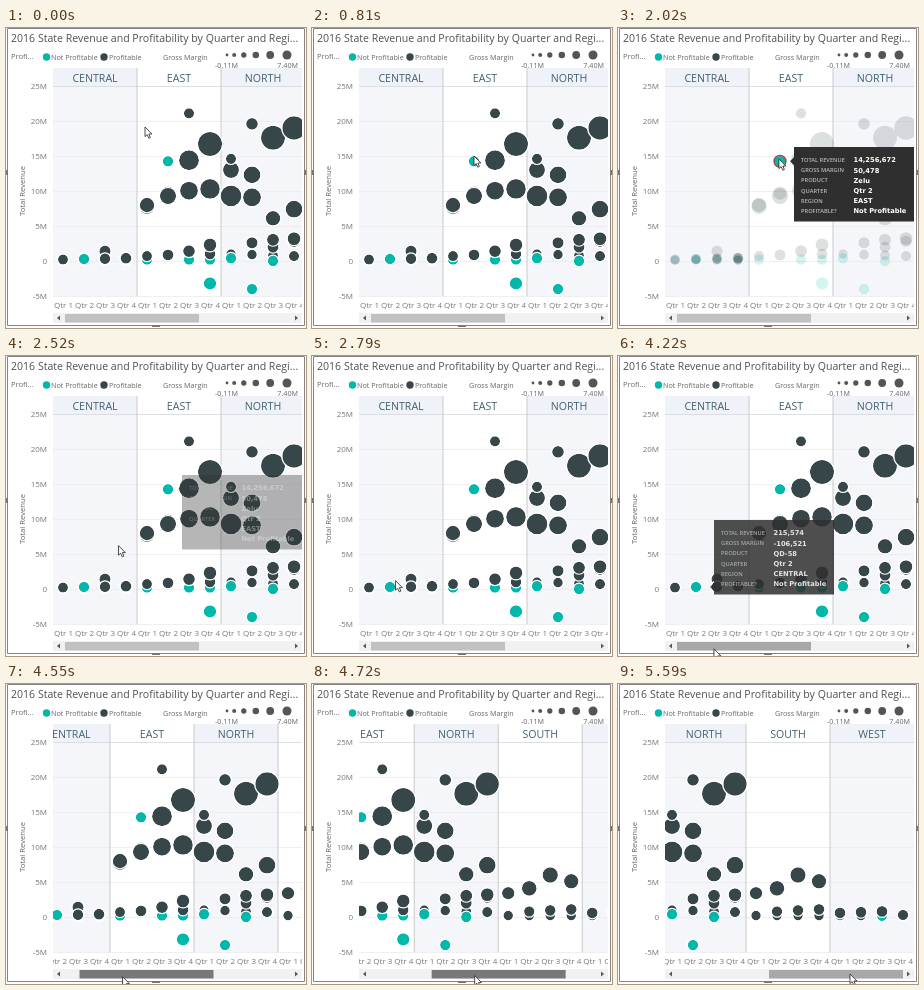
These frames come from a looping animation (300x300 px, 5640 ms). An HTML page with a canvas:

```html
<!DOCTYPE html>
<html lang="en">
<head>
<meta charset="utf-8">
<title>Revenue by quarter and region</title>
<style>
  html, body { margin: 0; width: 100%; height: 100%; overflow: hidden; background: #fff; }
  canvas { display: block; width: 300px; height: 300px; }
</style>
</head>
<body>
<canvas id="stage"></canvas>
<script>
const LOOP = 5640;
const DARK = '#374649', TEAL = '#01b8aa';
const VIEW = { x: 47, y: 40, w: 249, h: 243 };
const PANEL = 84, STEP = 21;
const MAX_SCROLL = 171, THUMB_RANGE = 92, GRAB_X = 102;
const SANS = '"Open Sans", "Noto Sans", sans-serif';
const WIDE = '"DejaVu Sans", sans-serif';
const regions = ['CENTRAL', 'EAST', 'NORTH', 'SOUTH', 'WEST'];

const canvas = document.getElementById('stage');
const ctx = canvas.getContext('2d');
const ratio = window.devicePixelRatio || 1;
canvas.width = canvas.height = 300 * ratio;

const mix = (a, b, p) => a + (b - a) * p;
const ramp = (t, start, length) => Math.min(1, Math.max(0, (t - start) / length));
const smooth = p => p * p * (3 - 2 * p);
const linear = p => p;
const easeIn = p => p * p;
const easeOut = p => 1 - (1 - p) ** 2;
const revenueY = millions => 233 - 7 * millions;

// A product's bubbles run over consecutive quarters between two [revenue, radius] ends.
const bubbles = [];
function series(first, last, from, to, ease = linear, teal = false) {
  for (let q = first; q <= last; q++) {
    const p = last > first ? (q - first) / (last - first) : 0;
    bubbles.push({
      x: 57 + STEP * q,
      y: revenueY(mix(from[0], to[0], ease(p))),
      r: mix(from[1], to[1], p),
      teal
    });
  }
}
function loss(q, revenue, r = 5.2) {
  series(q, q, [revenue, r], [revenue, r], linear, true);
  return bubbles[bubbles.length - 1];
}
function single(q, revenue, r) {
  series(q, q, [revenue, r], [revenue, r]);
}

// Central: a stack near zero that thickens each quarter
for (let q = 0; q < 4; q++) {
  for (let i = 0; i <= q; i++) single(q, 0.1 + 0.2 * (i % 3), 4.6);
  loss(q, 0.2, 4.6);
}
series(2, 3, [1.4, 5.6], [0.4, 5.4]);
series(0, 3, [0.2, 5], [0.4, 5.4]);
const centralLoss = loss(1, 0.3);

// East
[4, 6, 7].forEach(q => loss(q, 0.2));
series(4, 5, [7.8, 7.7], [9.7, 6.6]);
series(4, 7, [8, 7.2], [10.3, 9.9], easeOut);
series(6, 7, [14.4, 10], [16.7, 12]);
single(6, 21.1, 5.1);
single(7, 1, 5.3);
series(4, 7, [0.7, 5], [2.3, 6.4], easeIn);
loss(7, -3.2, 6.2);
const eastLoss = loss(5, 14.25);

// North
series(8, 9, [13, 8], [12.3, 8.4]);
series(8, 9, [14.6, 5.1], [19.6, 5.9]);
series(8, 9, [9.3, 10.4], [9.1, 9]);
series(8, 11, [1, 4.7], [0.7, 5.1]);
series(10, 11, [2, 5.5], [2.8, 5.6]);
series(9, 11, [2.6, 5.6], [3.2, 6.4], easeOut);
series(10, 11, [6.1, 7.3], [7.4, 8.4]);
series(10, 11, [17.6, 12], [19, 11.7]);
loss(8, 0.4);
loss(9, -4);
loss(10, 0);

// South and West
series(12, 19, [0.2, 4.8], [0.2, 4.8]);
series(12, 13, [3.4, 6.2], [4.1, 7.4]);
series(14, 15, [6, 7.7], [5.1, 7.2]);
series(13, 15, [0.8, 5.2], [1.1, 5.4]);
loss(18, 0.1, 4.8);
series(16, 18, [0.6, 5.4], [0.8, 5.4]);
single(19, 0.3, 5.2);

const labels = ['TOTAL REVENUE', 'GROSS MARGIN', 'PRODUCT', 'QUARTER', 'REGION', 'PROFITABLE?'];
const hovers = [
  { x: 176, y: 119, mark: eastLoss, enter: 870, show: 1230, leave: 2190,
    values: ['14,256,672', '50,478', 'Zelu', 'Qtr 2', 'EAST', 'Not Profitable'] },
  { x: 96, y: 164, mark: centralLoss, enter: 2850, show: 3380, leave: 3960,
    values: ['215,574', '-106,521', 'QD-58', 'Qtr 2', 'CENTRAL', 'Not Profitable'] }
];
const dimOf = (h, t) => ramp(t, h.enter, 170) - ramp(t, h.leave, 120);
const tipAlpha = (h, t) => t < h.show ? 0 : 1 - ramp(t, h.leave + 240, 140);

const moves = [
  { start: 280, end: 810, x: 162, y: 128 },
  { start: 910, end: 1040, x: 161, y: 131 },
  { start: 2010, end: 2920, x: 79, y: 230 },
  { start: 3780, end: 4230, x: 96, y: 293 },
  { start: 4230, end: 4400, x: GRAB_X, y: 293 },
  { start: 4420, end: 5050, x: 232, y: 290 }
];
function pointerAt(t) {
  let x = 139, y = 99;
  for (const m of moves) {
    const p = smooth(ramp(t, m.start, m.end - m.start));
    x = mix(x, m.x, p);
    y = mix(y, m.y, p);
  }
  return { x, y };
}
function thumbAt(t) {
  if (t < 4420) return 0;
  return Math.min(THUMB_RANGE, pointerAt(t).x - GRAB_X);
}

function text(str, x, y, size, color, align = 'left', weight = 400, family = SANS) {
  ctx.font = `${weight} ${size}px ${family}`;
  ctx.fillStyle = color;
  ctx.textAlign = align;
  ctx.fillText(str, x, y + size * 0.36);
}

function rect(x, y, w, h, color) {
  ctx.fillStyle = color;
  ctx.fillRect(x, y, w, h);
}

function dot(x, y, r, color) {
  ctx.beginPath();
  ctx.arc(x, y, r, 0, Math.PI * 2);
  ctx.fillStyle = color;
  ctx.fill();
}

function outline(color, width) {
  ctx.strokeStyle = color;
  ctx.lineWidth = width;
  ctx.stroke();
}

function poly(points, color) {
  ctx.beginPath();
  points.forEach(([x, y]) => ctx.lineTo(x, y));
  ctx.closePath();
  ctx.fillStyle = color;
  ctx.fill();
}

function drawFrame() {
  rect(0, 0, 300, 300, '#fff');
  ctx.beginPath();
  ctx.rect(1.5, 0.5, 297, 297);
  outline('#858585', 1);
  rect(0, 142, 2, 5, '#777');
  rect(298, 142, 2, 5, '#777');
  rect(146, 297, 8, 2, '#777');
}

function drawLegend() {
  text('2016 State Revenue and Profitability by Quarter and Regi...', 5, 10, 10.57, '#505050');
  text('Profi...', 5, 28, 7.6, '#666');
  dot(40.5, 29, 3.7, TEAL);
  text('Not Profitable', 45, 29, 7.2, '#666');
  dot(98, 29, 3.7, DARK);
  text('Profitable', 103, 29, 7.2, '#666');
  text('Gross Margin', 157, 29, 7.2, '#666');
  for (let i = 0; i < 6; i++) dot(221 + 6 * i + 1.2 * i * i, 27, 1.4 + 0.62 * i, '#555');
  text('-0.11M', 209, 37, 7.2, '#666');
  text('7.40M', 292, 37, 7.2, '#666', 'right');
}

function drawAxis() {
  for (let value = -5; value <= 25; value += 5) {
    text(value ? value + 'M' : '0', 41, revenueY(value), 8, '#777', 'right');
  }
  ctx.save();
  ctx.translate(16, 163);
  ctx.rotate(-Math.PI / 2);
  text('Total Revenue', 0, 0, 7.7, '#666', 'center');
  ctx.restore();
}

function drawBubble({ x, y, r, teal }, dim, marked) {
  ctx.globalAlpha = marked ? 1 : 1 - 0.83 * dim;
  dot(x, y, r, teal ? TEAL : DARK);
  ctx.beginPath();
  ctx.arc(x, y, r + 0.6, 0, Math.PI * 2);
  outline('#fff', 1.2);
  if (marked) {
    ctx.globalAlpha = dim;
    outline('#8a4a50', 1.6);
  }
  ctx.globalAlpha = 1;
}

function drawPlot(t, scroll) {
  const hover = hovers[t < hovers[1].enter ? 0 : 1];
  const dim = dimOf(hover, t);
  ctx.save();
  ctx.beginPath();
  ctx.rect(VIEW.x, VIEW.y, VIEW.w, VIEW.h);
  ctx.clip();
  ctx.translate(-scroll, 0);
  regions.forEach((name, i) => {
    const x = VIEW.x + PANEL * i;
    if (i % 2 === 0) {
      rect(x, 40, PANEL, 18, '#eff2f8');
      rect(x, 58, PANEL, 210, '#f5f6fa');
    }
    text(name, x + PANEL / 2, 50, 10.6, '#426170', 'center');
  });
  for (let value = -5; value <= 25; value += 5) {
    rect(VIEW.x, revenueY(value), PANEL * 5, 0.8, value < 25 ? '#ebebed' : '#d4d9dd');
  }
  for (let i = 1; i < 5; i++) rect(VIEW.x + PANEL * i - 0.5, 40, 1, 228, '#c9c9cc');
  for (let q = 0; q < 20; q++) {
    text('Qtr ' + (q % 4 + 1), 57.5 + STEP * q, 277, 8, '#777', 'center');
  }
  bubbles.forEach(b => drawBubble(b, dim, b === hover.mark));
  ctx.restore();
}

function drawScrollbar(t, thumb) {
  const pressed = t >= 4420 && t < 5180;
  const color = pressed ? '#787878' : t >= 4180 ? '#a8a8a8' : '#c1c1c1';
  rect(47, 285, 249, 10, '#f1f1f1');
  rect(59 + thumb, 286, 134, 8.5, color);
  poly([[51, 290], [54, 287.5], [54, 292.5]], '#555');
  poly([[292, 290], [289, 287.5], [289, 292.5]], '#555');
}

function drawTip(hover, t) {
  const { x, y, mark, values } = hover;
  ctx.globalAlpha = tipAlpha(hover, t);
  rect(x, y, 120, 74.5, '#2f2f2f');
  poly([[x, mark.y - 4], [x - 4, mark.y], [x, mark.y + 4]], '#2f2f2f');
  labels.forEach((label, i) => {
    const row = y + 13 + 10.15 * i;
    text(label, x + 7, row, 5.7, '#b8b8b8', 'left', 600);
    text(values[i], x + 59.5, row, 6.7, '#fff', 'left', 700, WIDE);
  });
  ctx.globalAlpha = 1;
}

function drawPointer(t) {
  const { x, y } = pointerAt(t);
  ctx.save();
  ctx.translate(x, y);
  poly([[0, 0], [0, 9.6], [2.2, 7.6], [3.8, 11.2], [5.4, 10.5], [3.9, 7], [6.9, 7]], '#fff');
  outline('#222', 0.8);
  ctx.restore();
}

function draw(t) {
  const thumb = thumbAt(t);
  ctx.setTransform(ratio, 0, 0, ratio, 0, 0);
  drawFrame();
  drawLegend();
  drawAxis();
  drawPlot(t, thumb * MAX_SCROLL / THUMB_RANGE);
  drawScrollbar(t, thumb);
  hovers.forEach(hover => drawTip(hover, t));
  drawPointer(t);
}

const start = performance.now();
function tick() {
  draw((performance.now() - start) % LOOP);
  requestAnimationFrame(tick);
}
tick();
</script>
</body>
</html>
```
